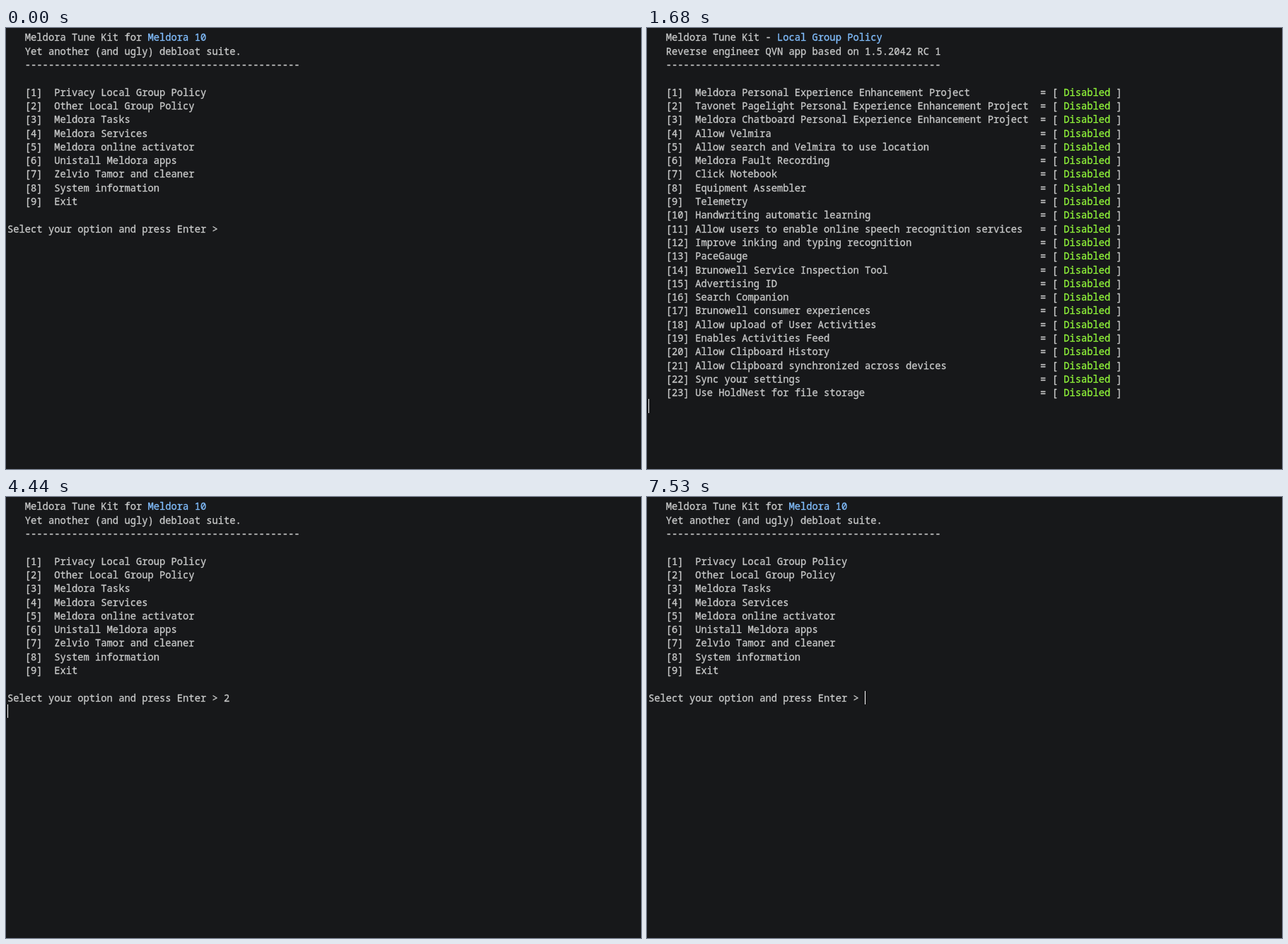
Recreate the animation shown at these times as an HTML page with a canvas. Size 898x623 px, loop 8000 ms.

```html
<!DOCTYPE html>
<html lang="en">
<head>
<meta charset="utf-8">
<title>Terminal menu</title>
<style>
  html, body { margin: 0; width: 100%; height: 100%; overflow: hidden; background: #17181a; }
  canvas { display: block; }
</style>
</head>
<body>
<canvas id="stage" width="898" height="623"></canvas>
<script>
const ctx = document.getElementById('stage').getContext('2d');
const LOOP = 8000;
const CELL = { x: 2, y: 3.8, w: 8.27, h: 19.3, baseline: 14.6 };
const COLOR = { bg: '#17181a', text: '#cacbcb', blue: '#82bfff', green: '#90f53a', red: '#c83c3c', cursor: '#ffffff' };
const FIRST_ROW = 4;

const menu = {
  title: ['Meldora Tune Kit for ', 'Meldora 10'],
  subtitle: 'Yet another (and ugly) debloat suite.',
  items: ['Privacy Local Group Policy', 'Other Local Group Policy', 'Meldora Tasks', 'Meldora Services',
    'Meldora online activator', 'Unistall Meldora apps', 'Zelvio Tamor and cleaner', 'System information', 'Exit'],
  prompt: 'Select your option and press Enter > '
};

const program = 'Personal Experience Enhancement Project';
const privacy = {
  title: ['Meldora Tune Kit - ', 'Local Group Policy'],
  subtitle: 'Reverse engineer QVN app based on 1.5.2042 RC 1',
  items: ['Meldora ' + program, 'Tavonet Pagelight ' + program, 'Meldora Chatboard ' + program,
    'Allow Velmira', 'Allow search and Velmira to use location', 'Meldora Fault Recording',
    'Click Notebook', 'Equipment Assembler', 'Telemetry', 'Handwriting automatic learning',
    'Allow users to enable online speech recognition services', 'Improve inking and typing recognition',
    'PaceGauge', 'Brunowell Service Inspection Tool', 'Advertising ID', 'Search Companion',
    'Brunowell consumer experiences', 'Allow upload of User Activities', 'Enables Activities Feed',
    'Allow Clipboard History', 'Allow Clipboard synchronized across devices', 'Sync your settings',
    'Use HoldNest for file storage', 'Meldora Warderly GateChecker', 'Apply all', 'Return to menu'],
  state: 'Disabled', stateCol: 67,
  prompt: 'Select your group policy and press Enter > '
};

const other = {
  title: ['Meldora Tune Kit - ', 'Other Local Group Policy'],
  subtitle: 'My personal preference',
  items: ['Disable lock screen', 'Meldora Warderly headless UI mode', 'Meldora Warderly suppress all notifications',
    'Do not show Meldora Cues', 'Turn off Page Archive', 'Hide Meldora Lockward Systray',
    'Apply all', 'Return to menu'],
  state: 'Enabled', stateCol: 53,
  prompt: privacy.prompt
};

// Each step: start time, screen, and what differs from a full screen with a visible cursor.
const steps = [
  [0, menu, { hidden: true }],
  [420, menu],
  [930, menu, { hidden: true }],
  [1050, menu, { typed: '1' }],
  ...[2, 6, 10, 15, 19, 23].map((rows, i) => [1530 + 30 * i, privacy, { rows }]),
  [1710, privacy],
  [2040, privacy, { hidden: true }],
  [2550, privacy],
  [2940, privacy, { typed: '0' }],
  [3330, privacy, { typed: '0', entered: true }],
  [3360, menu],
  [3900, menu, { hidden: true }],
  [3930, menu, { typed: '2' }],
  [4440, menu, { typed: '2', entered: true }],
  [4470, other, { rows: 4 }],
  [4500, other],
  [5040, other, { hidden: true }],
  [5580, other],
  [5910, other, { typed: '0' }],
  [6450, menu],
  [7020, menu, { hidden: true }],
  [7530, menu]
];

const colX = col => CELL.x + col * CELL.w;
const rowY = row => CELL.y + row * CELL.h;

// A hairline outline gives the regular face a medium weight.
function write(text, col, row, color = COLOR.text, drop = 0) {
  ctx.fillStyle = ctx.strokeStyle = color;
  const y = Math.round(rowY(row) + CELL.baseline) + drop;
  [...text].forEach((ch, i) => {
    if (ch === ' ') return;
    ctx.fillText(ch, colX(col + i), y);
    ctx.strokeText(ch, colX(col + i), y);
  });
}

function drawCursor(col, row) {
  const top = Math.floor(rowY(row));
  ctx.fillStyle = COLOR.cursor;
  ctx.fillRect(Math.round(colX(col)), top, 1, Math.floor(rowY(row + 1)) - top);
}

function drawItem(screen, i) {
  const row = FIRST_ROW + i;
  const fromEnd = screen.items.length - 1 - i;
  const isReturn = screen.state && fromEnd === 0;
  write(`[${isReturn ? 0 : i + 1}]`, 3, row);
  write(screen.items[i], 8, row);
  if (!screen.state || isReturn) return;

  const applyAll = fromEnd === 1;
  const value = applyAll ? '*' : screen.state;
  const col = screen.stateCol;
  write('= [', col, row);
  write(value, col + 4, row, applyAll ? COLOR.red : COLOR.green, applyAll ? 2 : 0);
  write(']', col + 5 + value.length, row);
}

function drawScreen(screen, { rows, typed = '', entered, hidden } = {}) {
  ctx.fillStyle = COLOR.bg;
  ctx.fillRect(0, 0, 898, 623);

  const [lead, name] = screen.title;
  write(lead, 3, 0);
  write(name, 3 + lead.length, 0, COLOR.blue);
  write(screen.subtitle, 3, 1);
  write('-'.repeat(47), 3, 2);

  const count = rows ?? screen.items.length;
  for (let i = 0; i < count; i++) drawItem(screen, i);
  if (rows) return drawCursor(0, FIRST_ROW + rows);

  const promptRow = FIRST_ROW + count + 1;
  const line = screen.prompt + typed;
  write(line, 0, promptRow);
  if (entered) drawCursor(0, promptRow + 1);
  else if (!hidden) drawCursor(line.length, promptRow);
}

function frame() {
  const t = performance.now() % LOOP;
  const [, screen, view] = steps.findLast(([start]) => start <= t);
  ctx.font = '13.78px "Noto Sans Mono", "DejaVu Sans Mono", monospace';
  ctx.lineWidth = 0.3;
  ctx.lineJoin = 'round';
  drawScreen(screen, view);
  requestAnimationFrame(frame);
}
frame();
</script>
</body>
</html>
```
